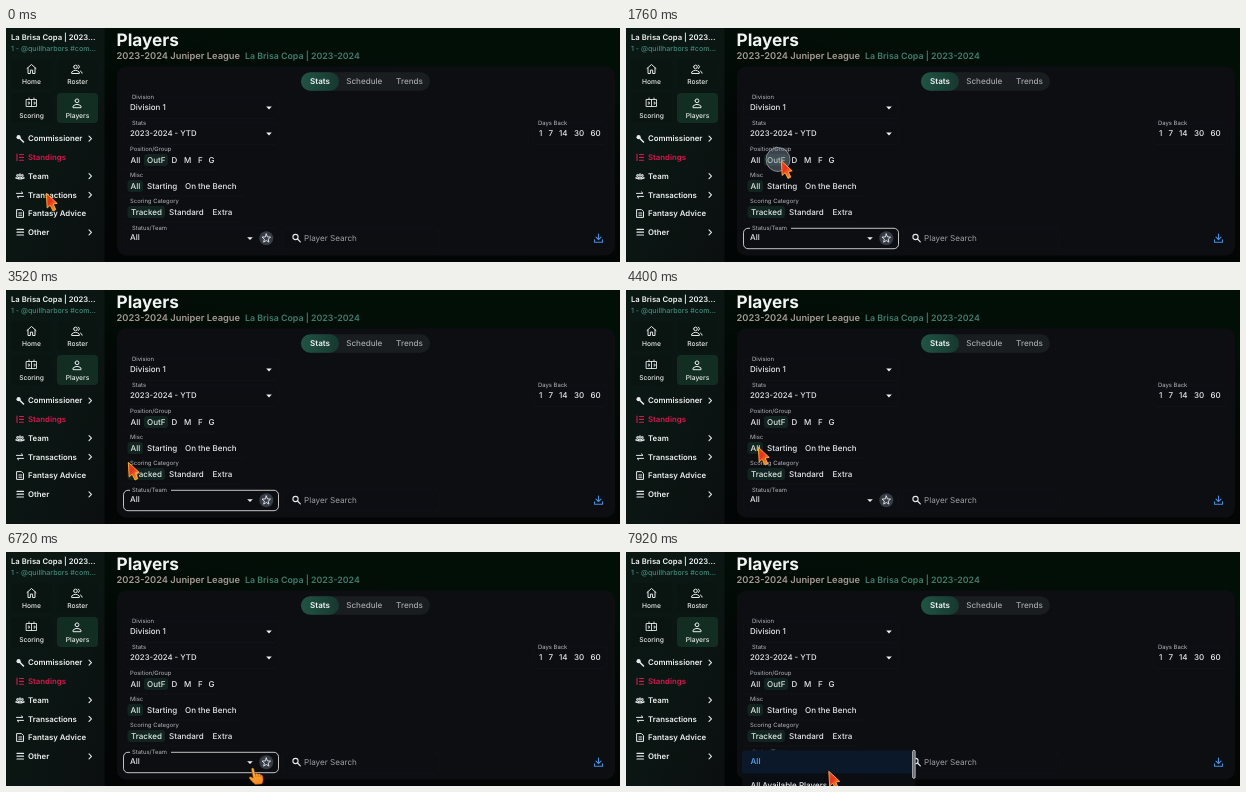
An HTML page that plays this animation: 614 px wide and 234 px high, repeating every 8000 ms.

```html
<!DOCTYPE html>
<html lang="en">
<head>
<meta charset="utf-8">
<title>Players</title>
<style>
html, body { margin: 0; width: 100%; height: 100%; overflow: hidden; background: #000; }
svg { display: block; width: 614px; height: 234px; }
text { font-family: Inter, "Open Sans", sans-serif; text-rendering: geometricPrecision; white-space: pre; }
</style>
</head>
<body>
<svg id="stage" viewBox="0 0 614 234" xmlns="http://www.w3.org/2000/svg">
  <defs>
    <linearGradient id="page" x1="0" y1="1" x2=".35" y2="0">
      <stop offset="0" stop-color="#030505"/><stop offset=".6" stop-color="#020705"/><stop offset="1" stop-color="#020f07"/>
    </linearGradient>
    <linearGradient id="side" x1="0" y1="0" x2="1" y2="1">
      <stop offset="0" stop-color="#0a1813"/><stop offset=".5" stop-color="#0b1613"/><stop offset="1" stop-color="#0b0f0f"/>
    </linearGradient>
    <linearGradient id="tab" x1="0" y1="0" x2="1" y2="0">
      <stop offset="0" stop-color="#1f5443"/><stop offset="1" stop-color="#17382f"/>
    </linearGradient>
    <linearGradient id="flame" x1="0" y1="0" x2=".8" y2="1">
      <stop offset="0" stop-color="#f04a1c"/><stop offset=".45" stop-color="#ee2f1a"/><stop offset="1" stop-color="#ff9a24"/>
    </linearGradient>
    <linearGradient id="glove" x1="0" y1="0" x2=".4" y2="1">
      <stop offset="0" stop-color="#ffc23a"/><stop offset="1" stop-color="#f98a1e"/>
    </linearGradient>
  </defs>
  <g id="base"></g>
  <rect id="focus" x="117.5" y="200.3" width="155" height="20.4" rx="4.5" fill="none" stroke="#c2c3c0"/>
  <g id="fields"></g>
  <g id="menu"></g>
  <circle id="ring" fill="#7f8b9c" fill-opacity=".42" stroke="#b4bcc6" stroke-opacity=".6"/>
  <g id="arrow">
    <path d="M.3 .3 L1.2 15 L4.2 12.2 L7 18 L9.8 16.6 L7.2 11 L11.2 10.4 Z" fill="url(#flame)" stroke="#ffb52e" stroke-width=".9" stroke-linejoin="round"/>
  </g>
  <g id="hand">
    <path d="M-1.6 1 Q-.6 -1 .8 .8 L2.2 6 Q4 4.6 5 6 Q6.8 5.2 7.6 6.8 Q9.4 6.4 9.8 8.4 L10.2 11.4 Q10.2 14 8.8 16 L2.2 16.4 Q-1.6 13.6 -4 10 Q-3.6 7.8 -1.2 9.2 L.2 10 Z" fill="url(#glove)" stroke="#8a3408" stroke-width=".5" stroke-linejoin="round"/>
    <path d="M2.4 6 L3 9 M5 6.2 L5.5 9 M7.6 7 L8 9.4" fill="none" stroke="#c0500f" stroke-width=".6"/>
  </g>
</svg>
<script>
const NS = "http://www.w3.org/2000/svg";
const $ = id => document.getElementById(id);
const PANEL = "#0c0e12";
let layer = $("base");

function add(tag, attrs) {
  const el = document.createElementNS(NS, tag);
  for (const key in attrs) el.setAttribute(key, attrs[key]);
  layer.append(el);
  return el;
}
const rect = (x, y, width, height, rx, fill, more) => add("rect", { x, y, width, height, rx, fill, ...more });
function text(str, x, y, size = 8, fill = "#e6e8ea", weight = 500, anchor = "start") {
  add("text", { x, y, fill, "font-size": size, "font-weight": weight, "text-anchor": anchor }).textContent = str;
}
const line = (d, stroke = "#e6e8ea", width = 1) =>
  add("path", { d, fill: "none", stroke, "stroke-width": width, "stroke-linecap": "round", "stroke-linejoin": "round" });
const label = (str, x, y) => text(str, x, y, 5.9, "#b4b7bb", 400);
const caret = (x, y) => add("path", { d: `M${x - 2.8} ${y - 1.4}h5.6l-2.8 2.9z`, fill: "#f0f1f2" });
const outline = (x, y, w, h) => rect(x, y, w, h, 4, "none", { stroke: "#111418", "stroke-width": .8 });

function person(x, y, s = 1, color) {
  line(`M${x - 1.9 * s} ${y - 2.5 * s}a${1.9 * s} ${1.9 * s} 0 1 0 ${3.8 * s} 0a${1.9 * s} ${1.9 * s} 0 1 0 ${-3.8 * s} 0` +
    `M${x - 4 * s} ${y + 4 * s}v${-1.2 * s}q${4 * s} ${-3.4 * s} ${8 * s} 0v${1.2 * s}z`, color);
}

function drawSidebar() {
  rect(0, 0, 98.5, 234, 0, "url(#side)");
  text("La Brisa Copa | 2023...", 5, 12, 7.7, "#f2f4f4", 600);
  text("1 - @quillharbors #com...", 5, 23, 7.1, "#3e8b79", 500);

  const cards = [["Home", 5, 31], ["Roster", 51, 31], ["Scoring", 5, 65], ["Players", 51, 65]];
  for (const [name, x, y] of cards) {
    rect(x, y, 41, 30, 4, name === "Players" ? "#122d22" : "#0a1511");
    text(name, x + 20.5, y + 25, 6.7, "#eceeee", 500, "middle");
  }
  line("M21 40.5L25.5 36.5L30 40.5M22 40v5.5h2.4v-3.4h2.2v3.4H29V40");
  person(69.5, 41.3, .95);
  line("M72.5 37q2.4 1.7 0 3.6M74.5 43q1.6 .6 1.6 2.2");
  line("M20.5 71.5h10v7h-10zM25.5 71.5v7M23 70v1.4M28 70v1.4M22.3 74.2h1v1.8h-1M28 74.2h1v1.8h-1", "#e6e8ea", .9);
  person(71, 75.3);

  const rows = ["Commissioner", "Standings", "Team", "Transactions", "Fantasy Advice", "Other"];
  rows.forEach((name, i) => {
    const y = 113.4 + i * 18.75;
    text(name, 22, y, 7.8, i === 1 ? "#d91850" : "#eef0f0", 600);
    if (i !== 1 && i !== 4) line(`M83 ${y - 5.2}l2.5 2.5l-2.5 2.5`, "#e6e8ea", 1.1);
  });
  line("M14 110.5l3.5 3.5", "#e6e8ea", 1.6);
  add("circle", { cx: 12.6, cy: 109.2, r: 2.1, fill: "#e6e8ea" });
  line("M13.5 126.5h4M13.5 129.4h4M13.5 132.3h4M11 126v6.5", "#d91850", 1.1);
  for (const [x, s] of [[11.5, .42], [16.5, .42], [14, .56]]) person(x, 148.3, s);
  line("M10.5 165.4h6.5l-1.6-1.5M17.5 168.4H11l1.6 1.5");
  line("M11 181.6h4.5l2 2v5.8H11zM12.8 185h3M12.8 187.2h3");
  line("M11 201.4h6.5M11 204.2h6.5M11 207h6.5", "#e6e8ea", 1.2);
}

function drawHeader() {
  text("Players", 110.5, 18, 17.2, "#f2f3f3", 700);
  text("2023-2024 Juniper League", 110.5, 31, 9.3, "#a59a92", 600);
  text("La Brisa Copa | 2023-2024", 239, 31, 8.8, "#3d7f70", 600);
  rect(111, 38.5, 498, 189, 9, PANEL);
  rect(295, 44.3, 129, 18.5, 9.25, "#1a1d20");
  rect(295, 44.3, 38, 18.5, 9.25, "url(#tab)");
  text("Stats", 314, 56.3, 8, "#f2f4f4", 600, "middle");
  text("Schedule", 358.3, 56.3, 8.1, "#a3a6a9", 500, "middle");
  text("Trends", 403.5, 56.3, 8.1, "#a3a6a9", 500, "middle");
}

// Each choice is [text, x]; the selected one gets a tinted plate.
function choices(title, y, items, picked, plateX, plateW, lineEnd) {
  line(`M118 ${y + 5}q0 2 2 2H${lineEnd}`, "#121518", .8);
  label(title, 124, y - 12);
  rect(plateX, y - 9, plateW, 12, 3, "#11241f");
  items.forEach(([str, x], i) => text(str, x, y, 8, i === picked ? "#dfe9e5" : "#e6e8ea"));
}

function drawFilters() {
  outline(117.5, 69, 155, 21.5);
  label("Division", 126, 71);
  text("Division 1", 124, 82.4);
  caret(263, 80);
  outline(117.5, 95, 155, 21.5);
  label("Stats", 126, 97);
  text("2023-2024 - YTD", 124, 108.4, 7.8);
  caret(263, 106);
  outline(527, 95, 74, 21.5);
  label("Days Back", 532, 97);
  [["1", 533], ["7", 542.5], ["14", 553], ["30", 568], ["60", 584.5]].forEach(([n, x]) => text(n, x, 108.4));

  choices("Position/Group", 135, [["All", 124.5], ["OutF", 141], ["D", 165.5], ["M", 178], ["F", 192], ["G", 202.5]], 1, 138, 24, 212);
  choices("Misc", 161, [["All", 124.5], ["Starting", 141], ["On the Bench", 179]], 0, 121.5, 15.5, 238);
  choices("Scoring Category", 187, [["Tracked", 125], ["Standard", 163], ["Extra", 206.5]], 0, 121.5, 37.5, 232);
  outline(117.5, 200, 155, 21);
  outline(276.5, 200, 156.5, 21);
}

function drawBottomRow() {
  rect(124, 197, 41, 6, 0, PANEL);
  label("Status/Team", 126, 202);
  text("All", 124, 212.4);
  caret(244, 210.6);
  add("circle", { cx: 260.3, cy: 210.3, r: 7, fill: "#353c45" });
  let star = "";
  for (let i = 0; i < 10; i++) {
    const a = i * Math.PI / 5, r = i % 2 ? 2 : 4.5;
    star += `${i ? "L" : "M"}${260.3 + r * Math.sin(a)} ${210.5 - r * Math.cos(a)}`;
  }
  line(star + "z", "#e8eaec", .9);
  add("circle", { cx: 289.5, cy: 209, r: 2.6, fill: "none", stroke: "#e6e8ea", "stroke-width": 1.1 });
  line("M291.5 211l2.8 2.8", "#e6e8ea", 1.2);
  text("Player Search", 298, 213, 8.1, "#9b9ea2", 400);
  line("M592.5 206v5.4M590 209.2l2.5 2.5l2.5-2.5M588.5 211.8v2.4h8v-2.4", "#4590e0", 1.1);
}

function drawMenu() {
  rect(116, 198.5, 173.5, 40, 2, "#0a0d12");
  rect(116, 198.5, 170.5, 23, 2, "#0a1829");
  text("All", 124.5, 212.4, 8, "#4b9ded", 600);
  text("All Available Players", 124.5, 235.6, 8);
  rect(286.7, 198.3, 2.4, 28, 1.2, "#55585c", { stroke: "#e4e6e8", "stroke-width": .8 });
}

rect(0, 0, 614, 234, 0, "url(#page)");
drawSidebar();
drawHeader();
drawFilters();
layer = $("fields");
drawBottomRow();
layer = $("menu");
drawMenu();

const LOOP = 8000, STEP = 80;
// Pointer stops: [time, x, y]
const stops = [
  [0, 40, 165], [400, 42, 166], [1500, 155, 132.5], [1840, 155, 132.5],
  [2700, 190, 135], [3440, 122, 172], [3600, 122, 172], [4300, 132, 157],
  [4640, 132, 157], [5760, 150, 188], [5920, 150, 188], [6560, 247, 216],
  [7120, 247, 216], [7840, 202.5, 219], [8000, 202.5, 219]
];
const clamp = v => Math.max(0, Math.min(1, v));
const ease = v => v * v * (3 - 2 * v);

function pointer(t) {
  const i = stops.findIndex(s => s[0] > t);
  const [t0, x0, y0] = stops[i - 1], [t1, x1, y1] = stops[i];
  const k = ease((t - t0) / (t1 - t0));
  return [x0 + (x1 - x0) * k, y0 + (y1 - y0) * k];
}
const show = (id, on) => $(id).setAttribute("opacity", +on);

function render(time) {
  const t = Math.floor((time % LOOP) / STEP) * STEP;
  const [x, y] = pointer(t);
  const overCaret = t >= 6480 && t < 7280;
  for (const id of ["arrow", "hand"]) $(id).setAttribute("transform", `translate(${x} ${y})`);
  show("arrow", !overCaret);
  show("hand", overCaret);
  show("focus", (t >= 1360 && t < 3920) || t >= 6400);
  show("menu", clamp((t - 7120) / 160));

  const ring = $("ring"), grow = clamp((t - 1520) / 240);
  ring.setAttribute("cx", x - 3);
  ring.setAttribute("cy", y - 1);
  ring.setAttribute("r", 4 + 8 * ease(grow));
  show("ring", t < 1520 ? 0 : 1 - clamp((t - 1760) / 240));
}

const start = performance.now();
function tick() {
  render(performance.now() - start);
  requestAnimationFrame(tick);
}
tick();
</script>
</body>
</html>
```
